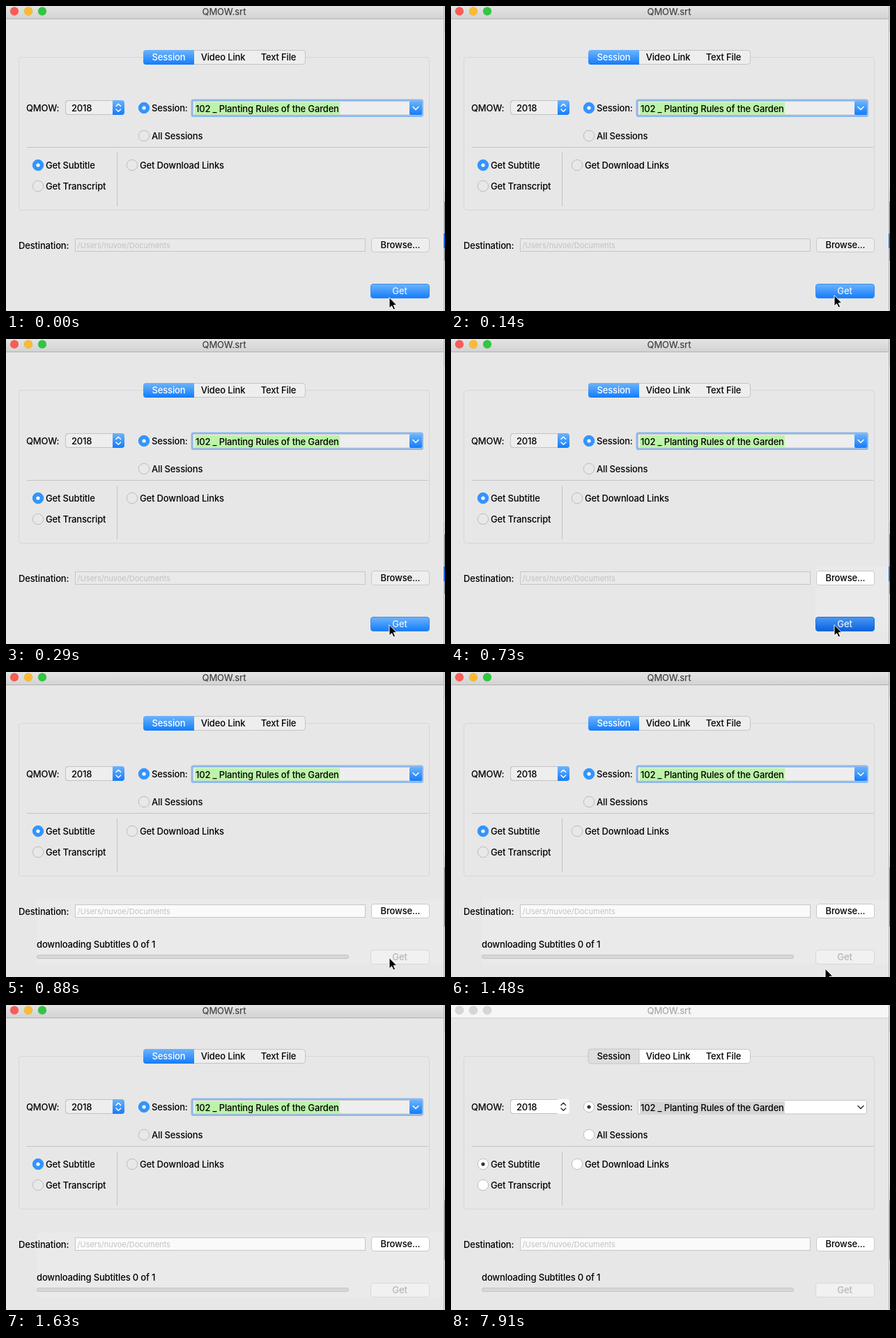
Animation, 630 px wide and 437 px high, one loop 8000 ms. Source, as an HTML page:

```html
<!DOCTYPE html>
<html lang="en">
<head>
<meta charset="utf-8">
<title>Subtitle downloader</title>
<style>
html, body { margin: 0; width: 100%; height: 100%; overflow: hidden; background: #e7e7e7; }
svg {
  display: block; width: 630px; height: 437px;
  font: 450 13px Inter, "Open Sans", sans-serif; letter-spacing: -.16px;
  --bar-top: #e4e4e4; --bar-low: #d3d3d3; --bar-line: #b3b3b3; --title: #444;
  --red: #fc5b57; --yellow: #fdbb30; --green: #2fc840;
  --accent-top: #6db4fb; --accent-low: #137cfb; --on-accent: #fff;
  --tab-text: #fff; --control: #eeeeee; --control-edge: #c4c4c4;
  --radio-on: #3394fd; --radio-off: #e8e8e8; --radio-edge: #3394fd; --dot: #fff;
  --mark: #bbf4a8; --ring: #8bb9ef;
  --lower: #eeeeee; --field: #e9e9e9;
  --get-top: #6db4fb; --get-low: #137cfb; --get-edge: #3c8df0; --get-text: #e8f3ff;
}
svg[data-phase=press] { --lower: #fff; --get-top: #4a99f4; --get-low: #0a61de; --get-edge: #1f6fd8; }
svg[data-phase=busy], svg[data-phase=idle] {
  --lower: #fff; --field: #fafafa;
  --get-top: #f1f1f1; --get-low: #f1f1f1; --get-edge: #d8d8d8; --get-text: #b6b6b6;
}
svg[data-phase=idle] {
  --bar-top: #f6f6f6; --bar-low: #f6f6f6; --bar-line: #d2d2d2; --title: #a9a9a9;
  --red: #d6d6d6; --yellow: #d6d6d6; --green: #d6d6d6;
  --accent-top: #fff; --accent-low: #fff; --on-accent: #333;
  --tab-text: #000; --control: #fff;
  --radio-on: #fff; --radio-off: #fff; --radio-edge: #bdbdbd; --dot: #333;
  --mark: #d5d5d5; --ring: none;
}
text { fill: #000; white-space: pre; }
.mid { text-anchor: middle; }
.line { stroke: #c3c3c3; fill: none; }
.control { fill: var(--control); stroke: var(--control-edge); }
.accent { fill: url(#accent); }
.light { stroke: #0002; stroke-width: .5; }
.chevron { fill: none; stroke: var(--on-accent); stroke-width: 1.5; stroke-linecap: round; stroke-linejoin: round; }
.busy-only, .press-only { visibility: hidden; }
[data-phase=busy] .busy-only, [data-phase=idle] .busy-only, [data-phase=press] .press-only { visibility: visible; }
[data-phase=idle] .patch, [data-phase=busy] .behind, [data-phase=idle] .behind { visibility: hidden; }
[data-phase=idle] .tab { fill: #dedede; stroke: #c4c4c4; }
[data-phase=idle] .drop { fill: none; }
</style>
</head>
<body>
<svg id="stage" viewBox="0 0 630 437" data-phase="ready">
  <defs>
    <linearGradient id="bar" x2="0" y2="1">
      <stop style="stop-color:var(--bar-top)"/><stop offset="1" style="stop-color:var(--bar-low)"/>
    </linearGradient>
    <linearGradient id="accent" x2="0" y2="1">
      <stop style="stop-color:var(--accent-top)"/><stop offset="1" style="stop-color:var(--accent-low)"/>
    </linearGradient>
    <linearGradient id="get" x2="0" y2="1">
      <stop style="stop-color:var(--get-top)"/><stop offset="1" style="stop-color:var(--get-low)"/>
    </linearGradient>
  </defs>

  <rect width="630" height="437" fill="#e7e7e7"/>
  <rect class="press-only" x="523" y="326" width="107" height="93" fill="#eaeaea"/>
  <rect class="busy-only patch" x="44" y="326" width="586" height="93" fill="#eaeaea"/>

  <rect width="628" height="18" fill="url(#bar)"/>
  <path d="M0 18.5H628" style="stroke:var(--bar-line)"/>
  <circle class="light" cx="12" cy="7.5" r="6" style="fill:var(--red)"/>
  <circle class="light" cx="32" cy="7.5" r="6" style="fill:var(--yellow)"/>
  <circle class="light" cx="52" cy="7.5" r="6" style="fill:var(--green)"/>
  <text class="mid" x="313" y="13" style="fill:var(--title)">QMOW.srt</text>
  <path d="M628.5 0V437" stroke="#b2b2b2"/>
  <path d="M629.5 0V437" stroke="#dedede"/>
  <path d="M629.5 38V262" stroke="#f6f6f6"/>
  <path d="M629.5 280V365" stroke="#8f8f8f"/>
  <rect class="behind" x="628" y="326" width="2" height="21" fill="#1c6fe0"/>

  <rect x="18.5" y="73.5" width="589" height="219" rx="4" fill="none" stroke="#d6d6d6"/>
  <path class="line" d="M30 202.5H606M159.5 210V287"/>

  <rect class="control" x="197.5" y="63.5" width="232" height="20" rx="4"/>
  <path class="accent tab" d="M270 63H201a4 4 0 0 0-4 4V80a4 4 0 0 0 4 4H270Z"/>
  <text class="mid" x="233.5" y="78" style="fill:var(--tab-text)">Session</text>
  <text class="mid" x="311.5" y="78">Video Link</text>
  <text class="mid" x="391" y="78">Text File</text>

  <text x="29" y="151">QMOW:</text>
  <rect class="control" x="85.5" y="135.5" width="84" height="20" rx="3.5"/>
  <path class="accent" d="M153 135H166a4 4 0 0 1 4 4V152a4 4 0 0 1-4 4H153Z"/>
  <path class="chevron" d="M158 143.5l3.300-3.300 3.300 3.300M158 148l3.300 3.300 3.300-3.300"/>
  <path class="line" d="M153 135.5H89a3.500 3.500 0 0 0-3.500 3.500V152a3.500 3.500 0 0 0 3.500 3.500H153"/>
  <text x="94" y="151">2018</text>

  <rect x="267" y="135" width="330.5" height="22.5" rx="2" fill="none" stroke-width="3" style="stroke:var(--ring)"/>
  <rect class="control" x="268.5" y="136.5" width="328" height="19.5" rx="1"/>
  <rect x="271" y="138" width="208" height="17.5" style="fill:var(--mark)"/>
  <rect class="accent drop" x="579" y="136" width="18" height="20" rx="2"/>
  <path class="chevron" d="M584 144.5l4 4 4-4"/>
  <text x="272" y="152">102 _ Planting Rules of the Garden</text>

  <g id="radios"></g>

  <text x="18" y="348">Destination:</text>
  <rect x="99.5" y="333.5" width="416" height="18" stroke="#c6c6c6" style="fill:var(--field)"/>
  <text x="102.5" y="347" font-size="11" font-weight="400" letter-spacing="0" style="fill:#c2c2c2">/Users/nuvoe/Documents</text>
  <rect x="524.5" y="332.5" width="83" height="20" rx="3.5" stroke="#c9c9c9" style="fill:var(--lower)"/>
  <text class="mid" x="566" y="347">Browse...</text>

  <g class="busy-only">
    <text x="44" y="395">downloading Subtitles 0 of 1</text>
    <rect x="44.5" y="405.5" width="447" height="5" rx="2.5" fill="#d7d7d7" stroke="#c3c3c3"/>
  </g>
  <rect x="523.5" y="398.5" width="84" height="20" rx="3.5" fill="url(#get)" style="stroke:var(--get-edge)"/>
  <text class="mid" x="565" y="413" style="fill:var(--get-text)">Get</text>

  <path id="cursor" d="M0 0V15.500L3.600 12.200 6 17.600 8.600 16.400 6.200 11.200H11Z" fill="#000" stroke="#fff"/>
</svg>
<script>
const LOOP = 8000;
const phases = [[0, 'ready'], [730, 'press'], [880, 'busy'], [7910, 'idle']];
const cursorStops = [[0, [550, 417.5]], [140, [550, 414.5]], [290, [550, 409.5]], [1480, [537, 425]], [1630, null]];
const options = [
  [198, 146, 'Session:', true],
  [198, 186, 'All Sessions', false],
  [46, 228, 'Get Subtitle', true],
  [46, 258, 'Get Transcript', false],
  [181, 228, 'Get Download Links', false]
];

const stage = document.getElementById('stage');
const cursor = document.getElementById('cursor');

const radio = ([x, y, label, on]) => `
  <circle cx="${x}" cy="${y}" r="7.7" style="fill:var(--radio-${on ? 'on' : 'off'});stroke:${on ? 'var(--radio-edge)' : '#bdbdbd'}"/>
  ${on ? `<circle cx="${x}" cy="${y}" r="2.6" style="fill:var(--dot)"/>` : ''}
  <text x="${x + 11}" y="${y + 5}">${label}</text>`;
document.getElementById('radios').innerHTML = options.map(radio).join('');

const stepAt = (steps, t) => steps.findLast(([start]) => start <= t)[1];

function draw(now) {
  const t = now % LOOP;
  stage.dataset.phase = stepAt(phases, t);
  const tip = stepAt(cursorStops, t);
  cursor.style.visibility = tip ? 'visible' : 'hidden';
  if (tip) cursor.setAttribute('transform', `translate(${tip})`);
}

const began = performance.now();
function tick() {
  draw(performance.now() - began);
  requestAnimationFrame(tick);
}
tick();
</script>
</body>
</html>
```
